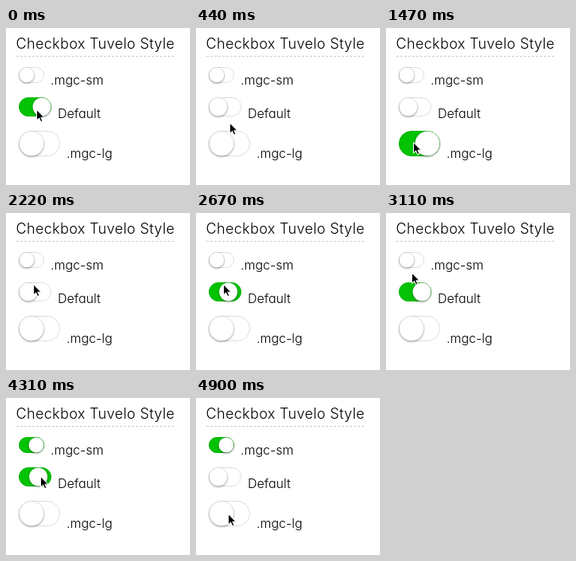
An HTML page for the animation above (5 s loop, 231 by 197 pixels).

```html
<!DOCTYPE html>
<html lang="en">
<head>
<meta charset="utf-8">
<title>Checkbox styles</title>
<style>
html, body { margin: 0; width: 100%; height: 100%; overflow: hidden; background: #fff; }
svg { display: block; width: 100vw; height: 100vh; }
text { font: 300 16px Inter, "Open Sans", sans-serif; font-feature-settings: "cv11"; fill: #000; }
.title { font-size: 18px; letter-spacing: .35px; }
.track { stroke: #dedede; fill: #fff; }
.fill { fill: #04c204; stroke: #04b404; }
.knob { fill: #fff; filter: drop-shadow(0 1px 1px rgba(0, 0, 0, .4)); }
.rim { fill: none; stroke: #000; stroke-opacity: .1; stroke-width: .7; }
</style>
</head>
<body>
<svg viewBox="0 0 231 197" preserveAspectRatio="none">
  <text class="title" x="12.5" y="26">Checkbox Tuvelo Style</text>
  <path d="M13 35.5H213" stroke="#ccc" stroke-dasharray="3 2"/>
  <g id="layer"></g>
  <g id="pointer">
    <path transform="translate(.5 .5) scale(.84)" d="M0 0V16L3.7 12.6L6.2 18.2L8.9 17L6.5 11.6H11.3Z" stroke="#fff" stroke-width="1.2" stroke-linejoin="round"/>
  </g>
</svg>
<script>
const LOOP = 5000;
const TICK = 148.2; // the picture holds still within a tick
const FLIP = 3;     // ticks a switch takes to slide

// Each flip is the tick at which the switch starts to change sides.
const switches = [
  { label: ".mgc-sm", y: 49, w: 32, h: 20, base: 71, on: 0, flips: [22] },
  { label: "Default", y: 87, w: 41, h: 24, base: 113, on: 1, flips: [0, 16, 28] },
  { label: ".mgc-lg", y: 129, w: 52, h: 32, base: 163, on: 0, flips: [4, 11] }
];

// Where the pointer rests, and from which tick to which.
const rests = [
  { from: 0, to: 1, x: 38, y: 102 },
  { from: 5, to: 6, x: 46, y: 135 },
  { from: 8, to: 8, x: 68, y: 142 },
  { from: 10, to: 12, x: 34, y: 143 },
  { from: 15, to: 19, x: 34, y: 89 },
  { from: 23, to: 25, x: 30, y: 60 },
  { from: 26, to: 26, x: 52, y: 72 },
  { from: 29, to: 30, x: 43, y: 98 },
  { from: 33, to: 34, x: 40, y: 145 }
];

function ease(p) {
  p = Math.max(0, Math.min(1, p));
  return p * p * (3 - 2 * p);
}

function switchValue({ on, flips }, k) {
  return flips.reduce((v, start, i) => {
    const direction = (on + i) % 2 ? -1 : 1;
    return v + direction * ease((k - start) / FLIP);
  }, on);
}

function pointerAt(k) {
  const i = rests.findIndex(r => r.to >= k);
  const b = rests[i], a = rests[i - 1] || b;
  const p = k >= b.from ? 1 : ease((k - a.to) / (b.from - a.to));
  return [a.x + (b.x - a.x) * p, a.y + (b.y - a.y) * p];
}

function add(parent, tag, attrs) {
  const el = document.createElementNS("http://www.w3.org/2000/svg", tag);
  for (const name in attrs) el.setAttribute(name, attrs[name]);
  return parent.appendChild(el);
}

const layer = document.getElementById("layer");
const pointer = document.getElementById("pointer");
const LEFT = 16;

for (const s of switches) {
  const box = { x: LEFT + .5, y: s.y + .5, width: s.w - 1, height: s.h - 1, rx: (s.h - 1) / 2 };
  add(layer, "rect", { class: "track", ...box });
  s.fill = add(layer, "rect", { class: "fill", ...box });
  s.knob = add(layer, "g", {});
  const circle = { cx: LEFT + s.h / 2, cy: s.y + s.h / 2, r: s.h / 2 - .5 };
  add(s.knob, "circle", { class: "knob", ...circle });
  add(s.knob, "circle", { class: "rim", ...circle });
  add(layer, "text", { x: LEFT + s.w + 8, y: s.base }).textContent = s.label;
}

function draw(now) {
  const k = Math.floor((now % LOOP + 15) / TICK);
  for (const s of switches) {
    const on = switchValue(s, k);
    s.fill.setAttribute("opacity", Math.min(1, on * 1.4));
    s.knob.setAttribute("transform", `translate(${on * (s.w - s.h)} 0)`);
  }
  pointer.setAttribute("transform", `translate(${pointerAt(k).join(" ")})`);
}

const begin = performance.now();
function tick() {
  draw(performance.now() - begin);
  requestAnimationFrame(tick);
}
tick();
</script>
</body>
</html>
```
